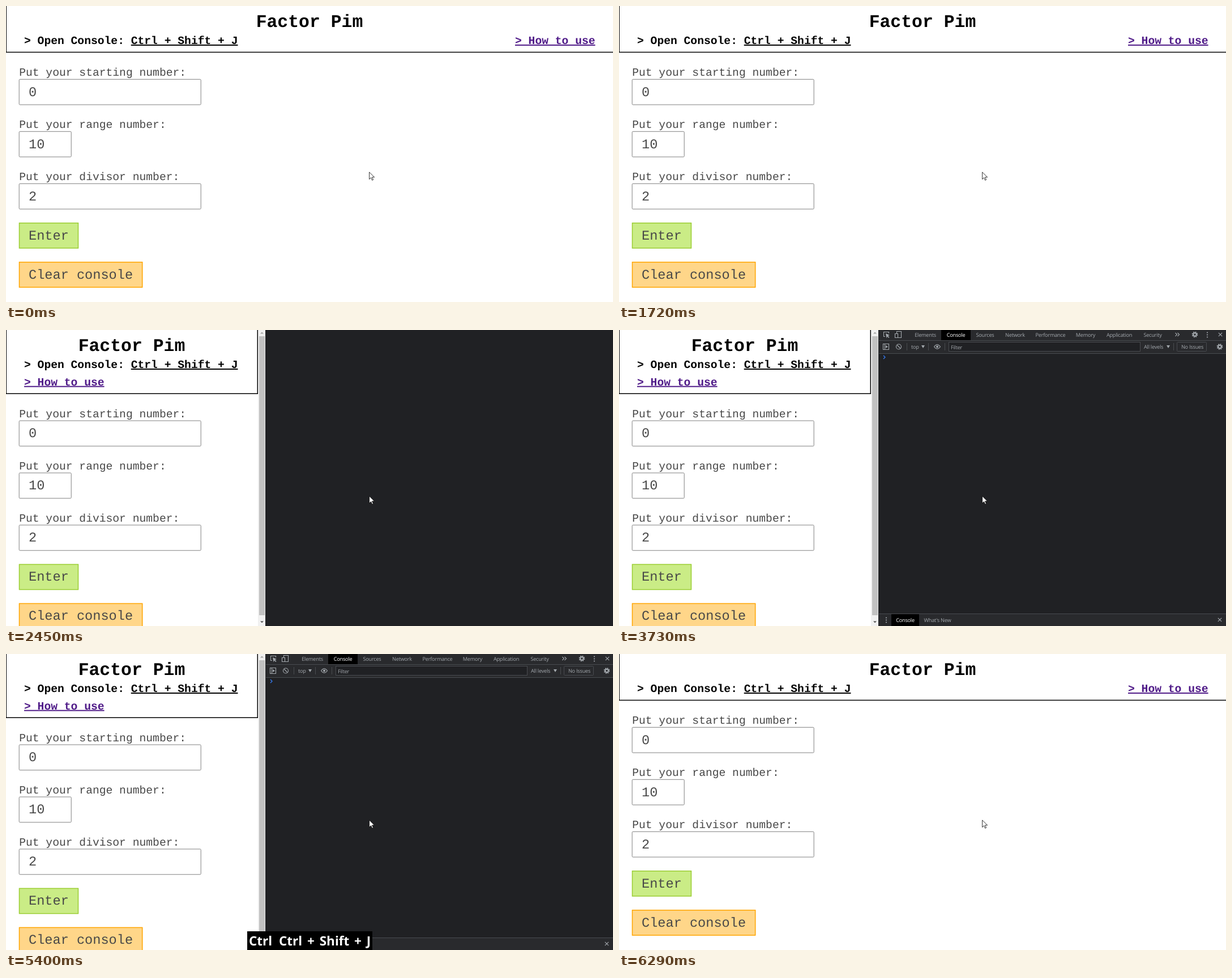
Recreate the animation shown at these times as an HTML page. Size 1072 px wide and 522 px high, loop 8.41 s.

```html
<!DOCTYPE html>
<html lang="en">
<head>
<meta charset="utf-8">
<title>Factor Pim</title>
<style>
  html, body { margin: 0; width: 100%; height: 100%; overflow: hidden; background: #fff; }
  svg { display: block; width: 1072px; height: 522px; }
  text { text-rendering: geometricPrecision; white-space: pre; }
  .page { font: 19.66px "Courier New", "Liberation Mono", monospace; fill: #484848; }
  .bold { font-weight: 700; fill: #000; }
  .title { font-size: 31.46px; text-anchor: middle; }
  .big { font-size: 23.6px; }
  .u { text-decoration: underline; text-decoration-thickness: 1.5px; }
  .link { fill: #4f1a88; }
  .field { fill: #fff; stroke: #808080; }
  .frame { fill: none; stroke: #000; stroke-width: 1.5; }
  .tools { font: 9.2px "Open Sans", "Noto Sans", sans-serif; letter-spacing: -.25px; fill: #a3a8ad; }
  .mid text { text-anchor: middle; }
  .tools .on { fill: #fff; }
  .bar { fill: #292a2d; }
  .rule { fill: none; stroke: #494c50; }
  .icon { fill: none; stroke: #a3a8ad; stroke-width: 1.1; }
  #keys { font: 700 22.5px "Open Sans", "Noto Sans", sans-serif; fill: #fff; word-spacing: 3px; }
</style>
</head>
<body>
<svg viewBox="0 0 1072 522">
  <defs>
    <g id="gear" class="icon">
      <circle r="4.3" stroke-width="2" stroke-dasharray="1.9 1.477"/>
      <circle r="2.7" stroke-width="2"/>
    </g>
    <g id="dots"><circle cy="-4" r="1.1"/><circle r="1.1"/><circle cy="4" r="1.1"/></g>
    <path id="close" class="icon" d="M-3.2-3.2 3.2 3.2M3.2-3.2-3.2 3.2"/>
    <path id="down" d="M-3-2h6l-3 5z"/>
  </defs>

  <g class="page">
    <text class="bold" x="32" y="67">&gt; Open Console: <tspan class="u">Ctrl + Shift + J</tspan></text>
    <g class="bold" data-t="0-2380,5670-8410">
      <text class="title" x="536" y="37">Factor Pim</text>
      <text class="u link" x="899" y="67">&gt; How to use</text>
      <path class="frame" d="M.2 0V81.500H1072"/>
    </g>
    <g class="bold" data-t="2380-5670">
      <text class="title" x="222" y="37">Factor Pim</text>
      <text class="u link" x="32" y="97.700">&gt; How to use</text>
      <path class="frame" d="M.2 0V112.200H444.300V0"/>
    </g>
    <g id="form">
      <text x="23.2" y="123">Put your starting number:</text>
      <rect class="field" x="23.2" y="129.3" width="321" height="44.8" rx="1.5"/>
      <text class="big" x="40" y="158.5">0</text>
      <text x="23.2" y="215">Put your range number:</text>
      <rect class="field" x="23.2" y="221.3" width="92" height="44.8" rx="1.5"/>
      <text class="big" x="40" y="250.5">10</text>
      <text x="23.2" y="307">Put your divisor number:</text>
      <rect class="field" x="23.2" y="313.3" width="321" height="44.8" rx="1.5"/>
      <text class="big" x="40" y="342.5">2</text>
      <rect x="23.5" y="382.7" width="104" height="44.3" fill="#caec86" stroke="#9acd32" stroke-width="1.5"/>
      <text class="big" x="40" y="411.5">Enter</text>
      <rect x="23.5" y="451.7" width="217.2" height="44.3" fill="#ffd689" stroke="#ffa500" stroke-width="1.5"/>
      <text class="big" x="40" y="480.7">Clear console</text>
    </g>
  </g>

  <g class="tools" data-t="2380-5670">
    <rect x="445" width="14" height="522" fill="#f1f1f1"/>
    <rect x="447" y="11" width="10" height="492" fill="#c1c1c1"/>
    <path d="M449 6.5h6l-3-3z" fill="#a3a3a3"/>
    <path d="M449 513.5h6l-3 3z" fill="#505050"/>
    <rect id="panel" x="458" width="614" height="522"/>

    <g data-t="2520-5670">
      <path class="bar" d="M459 0h613v18H459zM459 501h613v21H459z"/>
      <path class="rule" d="M459 18.5h613M459 500.5h613"/>
      <path fill="#000" d="M481 501h49v21h-49z"/>
    </g>
    <g class="mid" data-t="2740-5670">
      <use href="#dots" x="472" y="511.5"/>
      <text class="on" x="505.5" y="515">Console</text>
      <text x="562.5" y="515">What's New</text>
      <use href="#close" x="1061" y="511"/>
      <use href="#gear" x="1017" y="8"/>
      <use href="#dots" x="1039" y="8.5"/>
      <use href="#close" x="1062" y="8"/>
    </g>
    <g class="mid" data-t="3140-5670">
      <path fill="#000" d="M569 0h52v18h-52z"/>
      <g id="tabs"></g>
      <path class="icon" d="M982.500 5l3 3-3 3M986.500 5l3 3-3 3"/>
    </g>
    <g data-t="3240-5670">
      <path class="icon" d="M476.500 6V3.500H467.500V11.500H470"/>
      <path d="M471 6l7 3-3 1.200 2.500 2.500-1.200 1.200-2.500-2.500-1.200 3z"/>
      <path class="icon" d="M490.500 6V2.500H498.500V13.500H493M487.500 6.500h5v7h-5z"/>
    </g>
    <g data-t="3340-5670">
      <path class="bar" d="M459 19h613v22H459z"/>
      <path class="rule" d="M459 41.500h613M508.500 23v13M546.500 23v13M575.500 23v13M979.500 23v13"/>
      <path class="icon" d="M466.500 24.500h10v10h-10zM469.500 24.500v10"/>
      <path d="M471 27l4 2.500-4 2.500z"/>
      <circle class="icon" cx="494" cy="29.500" r="4.500"/>
      <path class="icon" d="M491 26.500l6 6"/>
    </g>
    <g data-t="3435-5670">
      <text x="516" y="33">top</text>
      <use href="#down" x="537" y="29"/>
      <path class="icon" d="M556.500 29.500q5.500-7.500 11 0q-5.500 7.500-11 0z"/>
      <circle cx="562" cy="29.500" r="2"/>
      <rect x="582.500" y="21.500" width="338" height="16" fill="#202124" stroke="#494c50"/>
      <text x="586" y="33.500">Filter</text>
    </g>
    <g data-t="3530-5670">
      <text x="927" y="33">All levels</text>
      <use href="#down" x="970" y="29"/>
    </g>
    <g class="mid" data-t="3630-5670">
      <rect class="rule" x="985.500" y="21.500" width="52" height="16" rx="1"/>
      <text x="1012.500" y="33">No Issues</text>
      <use href="#gear" x="1061" y="29.500"/>
    </g>
    <path data-t="3730-5670" fill="none" stroke="#367cf1" stroke-width="1.3" d="M467 45l3 3-3 3"/>
  </g>

  <path d="M641.600 293v12.500l3-2.800 2 4.600 2-.9-2-4.500h4z" fill="#fff" stroke="#000" stroke-width=".8"/>

  <g id="keys">
    <rect y="489" height="33" fill="#000"/>
    <text y="514"></text>
    <text y="514"></text>
  </g>
</svg>
<script>
const LOOP = 8410;
const $ = s => document.querySelector(s);

const tabs = { Elements: 541, Console: 595, Sources: 646.5, Network: 699.5,
  Performance: 762, Memory: 824, Application: 883.5, Security: 942.5 };
$('#tabs').innerHTML = Object.entries(tabs).map(([name, x]) =>
  `<text x="${x}" y="12"${name === 'Console' ? ' class="on"' : ''}>${name}</text>`).join('');

// Pressed-key captions: box left, box width, first label, second label
const combo = 'Ctrl + Shift + J';
const none = [0, 0, '', ''];
const ctrl = [514, 45, 'Ctrl', ''];
const pair = [480, 113, 'Ctrl', 'Shift'];
const full = [426, 221, 'Ctrl', combo];
const last = [453, 168, combo, ''];
const captions = [[0, none], [580, ctrl], [660, pair], [800, full], [1530, last], [1720, none],
  [5190, ctrl], [5260, pair], [5400, full], [6090, last], [6290, none]];

const timed = [...document.querySelectorAll('[data-t]')].map(el =>
  ({ el, spans: el.dataset.t.split(',').map(s => s.split('-').map(Number)) }));
const [box, first, second] = $('#keys').children;

function draw(t) {
  for (const { el, spans } of timed)
    el.style.display = spans.some(([a, b]) => t >= a && t < b) ? '' : 'none';

  const narrow = t >= 2380 && t < 5670;
  $('#form').setAttribute('transform', `translate(0 ${narrow ? 30.7 : 0})`);
  $('#panel').setAttribute('fill', t < 2450 ? '#121212' : '#202124');

  const [x, width, a, b] = captions.findLast(c => t >= c[0])[1];
  box.setAttribute('x', x);
  box.setAttribute('width', width);
  first.setAttribute('x', x + 3);
  second.setAttribute('x', x + 56);
  first.textContent = a;
  second.textContent = b;
}

const start = performance.now();
function tick() {
  draw((performance.now() - start) % LOOP);
  requestAnimationFrame(tick);
}
tick();
</script>
</body>
</html>
```
